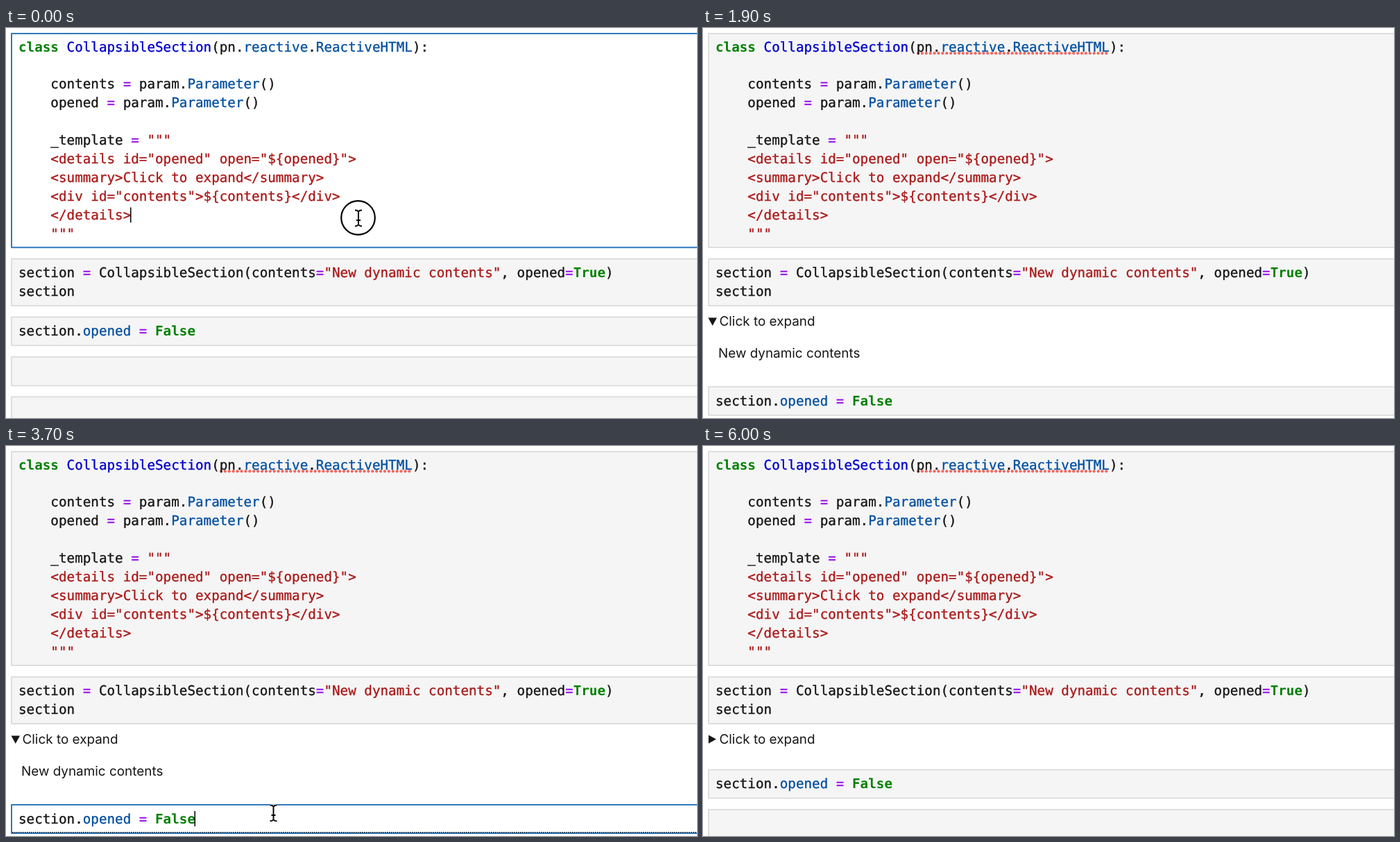
Recreate the animation shown at these times as an HTML page with a canvas. Size 996 by 562 pixels, loop 6100 ms.

```html
<!DOCTYPE html>
<html lang="en">
<head>
<meta charset="utf-8">
<title>Collapsible section</title>
<style>
html, body { margin: 0; width: 100%; height: 100%; overflow: hidden; background: #fff; }
canvas { display: block; }
</style>
</head>
<body>
<canvas id="stage" width="996" height="562"></canvas>
<script>
const ctx = document.getElementById('stage').getContext('2d');
ctx.textRendering = 'geometricPrecision';
ctx.lineJoin = 'round';

const LOOP = 6100;
const RUN_CLASS = 1100, RUN_SECTION = 1800, MOVE = 2900, CLICK = 3300, RUN_FALSE = 4000;
const BLUE = '#2f79bd', INK = '#161616';
const MONO = '19.25px "DejaVu Sans Mono", monospace';
const SANS = '18.9px Inter, sans-serif';
const LINE_HEIGHT = 26.9;

// style key: [colour, bold]
const STYLES = {
  t: [INK, false],
  k: ['#008000', true],
  d: ['#0000cc', false],
  p: ['#0550a0', false],
  o: ['#a020f0', true],
  s: ['#aa1a1a', false]
};

const CLASS_LINES = [
  ['k', 'class', 't', ' ', 'd', 'CollapsibleSection', 't', '(pn.', 'p', 'reactive', 't', '.', 'p', 'ReactiveHTML', 't', '):'],
  [],
  ['t', '    contents ', 'o', '=', 't', ' param.', 'p', 'Parameter', 't', '()'],
  ['t', '    opened ', 'o', '=', 't', ' param.', 'p', 'Parameter', 't', '()'],
  [],
  ['t', '    _template ', 'o', '=', 's', ' """'],
  ['s', '    <details id="opened" open="${opened}">'],
  ['s', '    <summary>Click to expand</summary>'],
  ['s', '    <div id="contents">${contents}</div>'],
  ['s', '    </details>'],
  ['s', '    """']
];
const SECTION_LINES = [
  ['t', 'section ', 'o', '=', 't', ' CollapsibleSection(contents', 'o', '=', 's', '"New dynamic contents"',
    't', ', opened', 'o', '=', 'k', 'True', 't', ')'],
  ['t', 'section']
];
const FALSE_LINES = [['t', 'section.', 'p', 'opened', 't', ' ', 'o', '=', 't', ' ', 'k', 'False']];

function code(lines, baseline) {
  ctx.lineWidth = 0.35;
  lines.forEach((line, row) => {
    const y = Math.floor(baseline + row * LINE_HEIGHT);
    let x = 18;
    for (let i = 0; i < line.length; i += 2) {
      const [color, bold] = STYLES[line[i]];
      const text = line[i + 1];
      ctx.font = (bold ? 'bold ' : '') + MONO;
      ctx.fillStyle = ctx.strokeStyle = color;
      ctx.fillText(text, x, y);
      // a hairline outline makes the regular weight slightly heavier
      if (!bold) ctx.strokeText(text, x, y);
      x += ctx.measureText(text).width;
    }
  });
}

function cell(top, bottom, active) {
  ctx.fillStyle = active ? '#fff' : '#f5f5f5';
  ctx.strokeStyle = active ? BLUE : '#d6d6d6';
  ctx.lineWidth = active ? 2 : 1.5;
  ctx.beginPath();
  ctx.rect(8, top, 1000, bottom - top);
  ctx.fill();
  ctx.stroke();
}

function caret(x, y, since, t) {
  if ((t - since) % 1000 >= 500) return;
  ctx.fillStyle = '#000';
  ctx.fillRect(x, y, 1.5, 22);
}

function spellingDots() {
  ctx.fillStyle = '#f0685f';
  for (let x = 310; x < 583; x += 5.9) {
    ctx.beginPath();
    ctx.arc(x, 36.4, 2.1, 0, 7);
    ctx.fill();
  }
}

function sans(text, x, y) {
  ctx.font = SANS;
  ctx.fillStyle = INK;
  ctx.fillText(text, x, y);
}

function details(open) {
  ctx.fillStyle = INK;
  ctx.fill(new Path2D(open ? 'M7.5 417.5H20L13.75 429Z' : 'M8 416.5V428.8L19 422.6Z'));
  sans('Click to expand', 23.5, 429);
  if (open) sans('New dynamic contents', 22, 475);
}

const beam = new Path2D('M-5-11.5Q-1-11.5 0-9Q1-11.5 5-11.5M-5 11.5Q-1 11.5 0 9Q1 11.5 5 11.5M0-9V9M-3 3H3');

function pointer(x, y, pressed) {
  ctx.save();
  ctx.translate(x, y);
  for (const [color, width] of [['#fff', 4], ['#000', 1.9]]) {
    ctx.strokeStyle = color;
    ctx.lineWidth = width;
    ctx.stroke(beam);
  }
  if (pressed) {
    ctx.lineWidth = 2.2;
    ctx.beginPath();
    ctx.arc(-0.5, -0.5, 24.3, 0, 7);
    ctx.stroke();
  }
  ctx.restore();
}

function draw(t) {
  const editing = t < RUN_CLASS;
  const shown = t >= RUN_SECTION;
  const open = t < RUN_FALSE;
  const focused = t >= CLICK && open;
  const top = !shown ? 416.5 : open ? 517 : 466.5;

  ctx.fillStyle = '#fff';
  ctx.fillRect(0, 0, 996, 562);

  cell(8, 316.2, editing);
  if (!editing) spellingDots();
  code(CLASS_LINES, 34);
  if (editing) caret(179, 258.5, 0, t);

  cell(332.8, 400.2, false);
  code(SECTION_LINES, 359.7);
  if (shown) details(open);

  cell(top, top + 41, focused);
  cell(top + 57.5, top + 98.9, false);
  cell(top + 115, top + 156.4, false);
  code(FALSE_LINES, top + 27);
  if (focused) {
    ctx.fillStyle = '#111';
    for (let x = 9; x < 996; x += 3) ctx.fillRect(x, top + 39, 1.5, 1.5);
    caret(271.5, top + 9, CLICK, t);
  }

  if (t < 500) pointer(508, 274, t < 300);
  if (t >= MOVE && open) {
    const u = Math.min(1, (t - MOVE) / (CLICK - MOVE));
    const e = u * u * (3 - 2 * u);
    pointer(508 - 122.5 * e, 274 + 255 * e, t >= CLICK && t < CLICK + 200);
  }
}

function tick() {
  draw(performance.now() % LOOP);
  requestAnimationFrame(tick);
}
tick();
</script>
</body>
</html>
```
